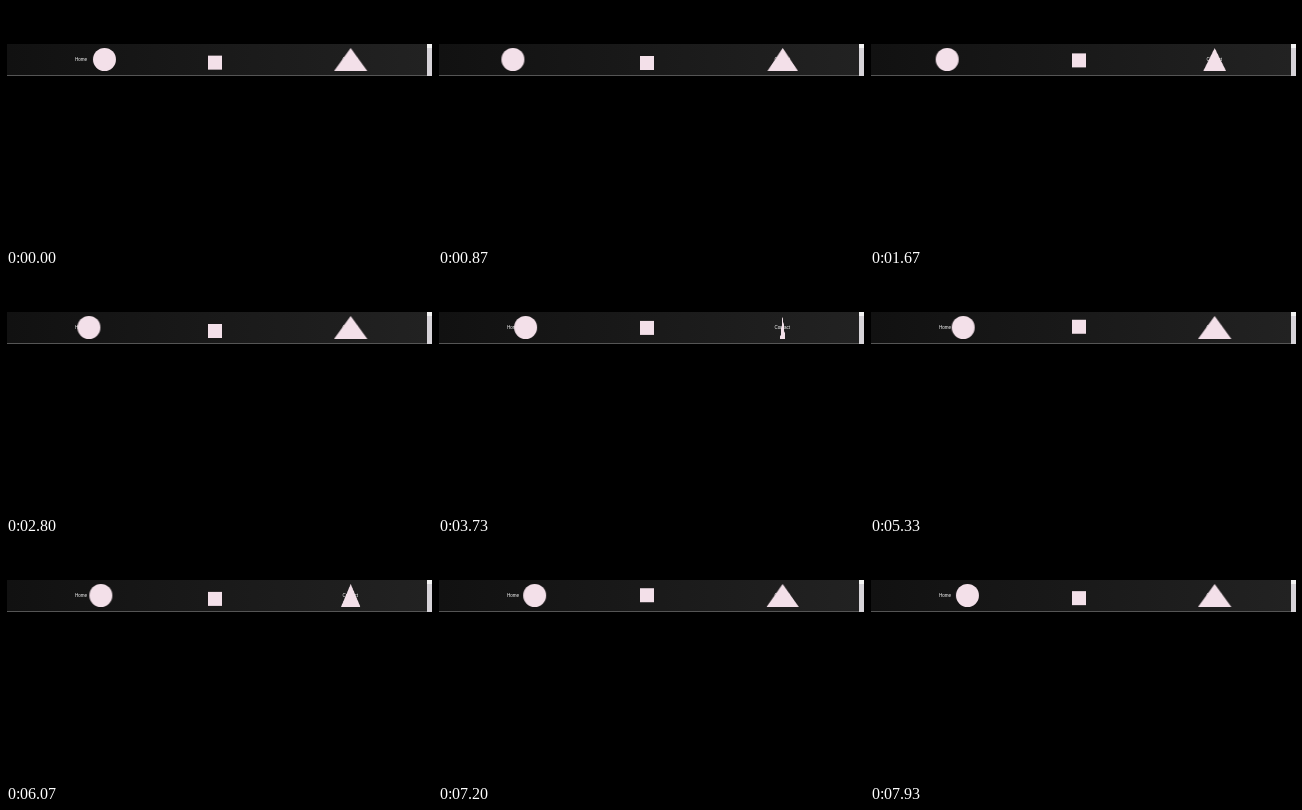
Animation of 426 by 240 pixels, one loop 8 s. Source, as an HTML page:

```html
<!DOCTYPE html>
<html lang="en">
<head>
<meta charset="utf-8">
<title>Navigation shapes</title>
<style>
  html, body { margin: 0; width: 100%; height: 100%; overflow: hidden; background: #000; }
  .stage { position: relative; width: 426px; height: 240px; overflow: hidden; }
  .stage * { position: absolute; }
  .bar {
    left: 1px; top: 38px; width: 420px; height: 31px;
    background: linear-gradient(to right, #111, #222);
    border-bottom: 1px solid #555;
  }
  .edge {
    left: 421px; top: 38px; width: 5px; height: 32px;
    background: linear-gradient(#f2f2f2 4px, #d6d3d8 4px);
  }
  .label {
    top: 50.5px; width: 40px; margin-left: -20px;
    font: 4.5px/6px "Liberation Sans", Arial, sans-serif;
    color: #fff; text-align: center;
  }
  .shape { background: #f3e0e9; animation: ease infinite paused; }
  .circle {
    left: 62.6px; top: 42.2px; width: 23px; height: 23px; border-radius: 50%;
    animation-name: slide; animation-duration: 10s;
  }
  .square {
    left: 201.8px; top: 49.5px; width: 14.2px; height: 14.2px;
    animation-name: bounce; animation-duration: 2s;
  }
  .triangle {
    left: 327.5px; top: 42px; width: 33.4px; height: 23px;
    clip-path: polygon(50% 0, 100% 100%, 0 100%);
    animation-name: turn; animation-duration: 2.5s;
  }
  @keyframes slide {
    from { transform: translateX(0); }
    to { transform: translateX(24px); }
  }
  @keyframes bounce {
    0%, 20%, 50%, 80%, 100% { transform: translateY(0); }
    40% { transform: translateY(-30%); }
    60% { transform: translateY(-22%); }
  }
  @keyframes turn {
    from { transform: rotateY(0); }
    to { transform: rotateY(180deg); }
  }
</style>
</head>
<body>
<div class="stage">
  <div class="bar"></div>
  <div class="edge"></div>
  <span class="label" style="left:75px">Home</span>
  <span class="label" style="left:209px">About</span>
  <span class="label" style="left:344.3px">Contact</span>
  <div class="shape circle"></div>
  <div class="shape square"></div>
  <div class="shape triangle"></div>
</div>
<script>
  const LOOP = 8000;
  const STEP = 1000 / 15;
  const OFFSET = 9440; // where the loop begins within the 10 s cycle
  const animations = document.getAnimations();
  const start = performance.now();

  function draw() {
    const elapsed = Math.max(0, performance.now() - start) % LOOP;
    // The small lead absorbs delays rounded to 10 ms.
    const time = Math.floor((elapsed + 4) / STEP) * STEP % LOOP;
    for (const animation of animations) animation.currentTime = OFFSET + time;
    requestAnimationFrame(draw);
  }
  draw();
</script>
</body>
</html>
```
